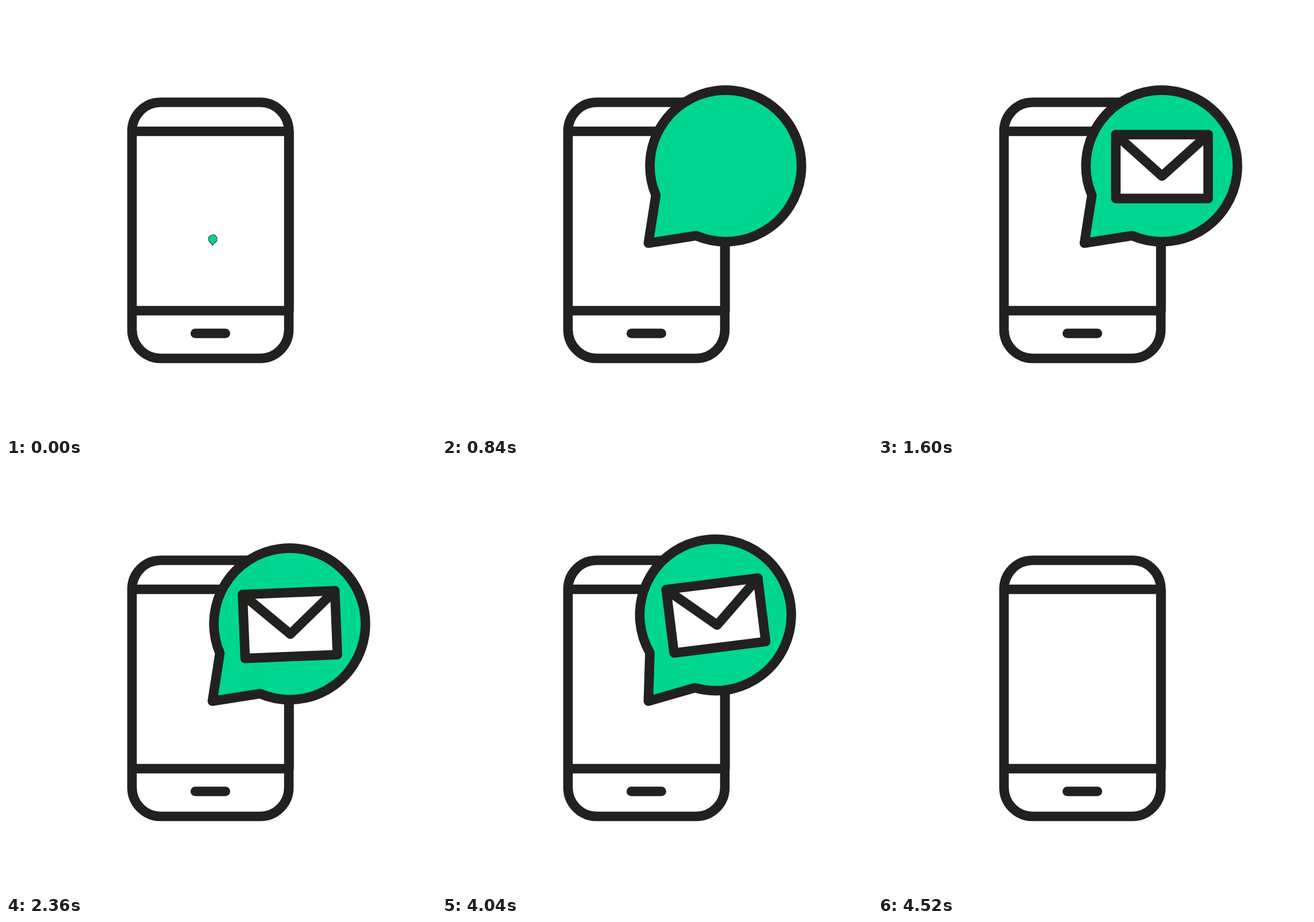
An HTML page that plays this animation: 748x748 px, repeating every 5960 ms.

```html
<!DOCTYPE html>
<html lang="en">
<head>
<meta charset="utf-8">
<title>Phone message</title>
<style>
  html, body { margin: 0; width: 100%; height: 100%; overflow: hidden; background: #fff; }
  svg { display: block; width: 100vw; height: 100vh; }
  .line { fill: none; stroke: #22211f; stroke-width: 16.6; stroke-linejoin: round; }
  .round { stroke-linecap: round; }
</style>
</head>
<body>
<svg viewBox="0 0 748 748">
  <defs>
    <path id="bubble-shape" d="M359 412.5 L372 329.3 A131.8 131.8 0 1 1 442 399.5 Z"/>
    <clipPath id="bubble-clip"><use href="#bubble-shape"/></clipPath>
  </defs>

  <g class="line">
    <rect x="219.2" y="167.5" width="272.8" height="445.5" rx="50"/>
    <path d="M219 218H492.4V530H219"/>
    <path class="round" d="M329.3 569.5H381.7"/>
  </g>

  <g id="bubble">
    <use href="#bubble-shape" fill="#00d68f"/>
    <g clip-path="url(#bubble-clip)">
      <g id="envelope" class="line round">
        <rect x="-80.3" y="-55.6" width="160.6" height="111.2" fill="#fff"/>
        <path d="M-80.3 -55.6L0 16.6L80.3 -55.6"/>
      </g>
    </g>
    <use href="#bubble-shape" class="line"/>
  </g>
</svg>
<script>
  const LOOP = 5960, STEP = 40;
  const TIP = { x: 359, y: 412.5 };
  const REST = { x: 494, y: 279.3 };

  // Each track is a list of [time in ms, value], eased in and out between neighbours.
  const bubbleTurn = [
    [-34, -45], [200, 27.6], [520, -7.1], [780, 0],
    [3780, 0], [4040, -7.1], [4355, 27.6], [4530, -45]
  ];
  const bubbleScale = [[-34, 0], [200, 1], [4355, 1], [4530, 0]];
  const envelopeDrop = [[820, 205], [1280, 0]];
  const shake = start => [[start, 0], [start + 120, -9], [start + 240, 9], [start + 360, 0]];
  const envelopeTurn = [1240, 2320, 3360].flatMap(shake);

  const bubble = document.getElementById('bubble');
  const envelope = document.getElementById('envelope');

  function valueAt(track, t) {
    const next = track.findIndex(([time]) => time > t);
    if (next === 0) return track[0][1];
    if (next < 0) return track[track.length - 1][1];
    const [t0, a] = track[next - 1], [t1, b] = track[next];
    const u = (t - t0) / (t1 - t0);
    return a + (b - a) * u * u * (3 - 2 * u);
  }

  function draw() {
    const t = Math.floor(performance.now() % LOOP / STEP) * STEP;
    const scale = valueAt(bubbleScale, t);
    const sink = 4 * (1 - scale);
    bubble.setAttribute('visibility', t < 4520 ? 'visible' : 'hidden');
    bubble.setAttribute('transform',
      `translate(${TIP.x} ${TIP.y + sink}) rotate(${valueAt(bubbleTurn, t)}) ` +
      `scale(${scale}) translate(${-TIP.x} ${-TIP.y})`);
    envelope.setAttribute('transform',
      `translate(${REST.x} ${REST.y + valueAt(envelopeDrop, t)}) rotate(${valueAt(envelopeTurn, t)})`);
    requestAnimationFrame(draw);
  }
  draw();
</script>
</body>
</html>
```
